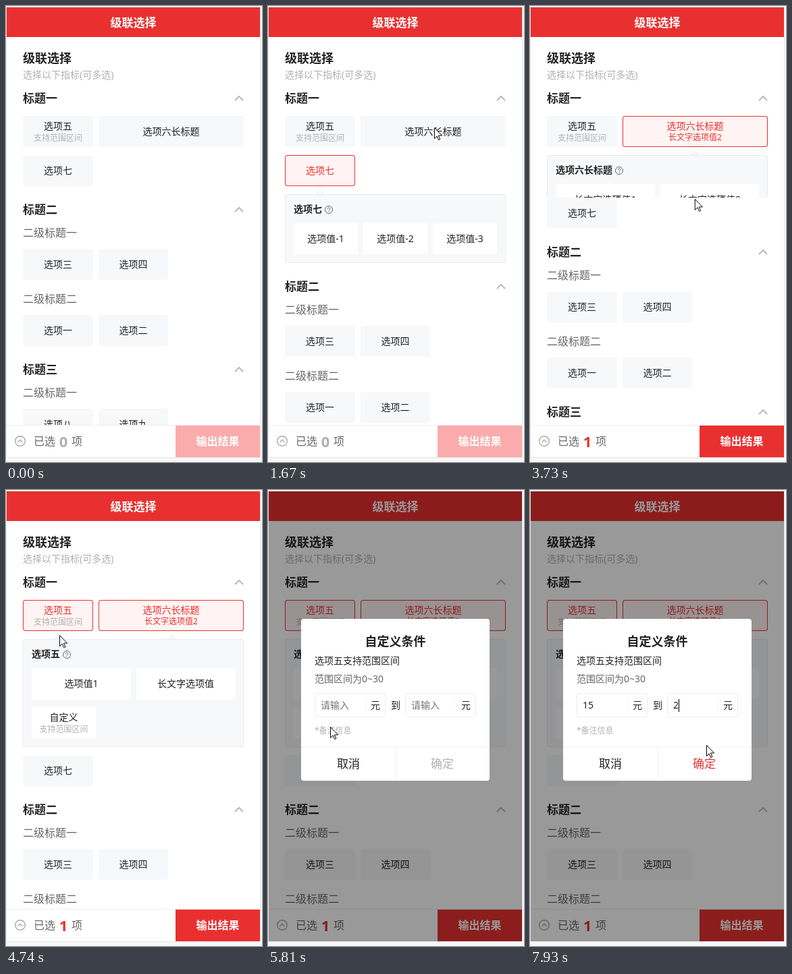
These frames come from a looping animation (379x676 px, 8000 ms). An HTML page:

```html
<!DOCTYPE html>
<html lang="zh-CN">
<head>
<meta charset="utf-8">
<title>级联选择</title>
<style>
@property --on { syntax: "<number>"; inherits: true; initial-value: 0; }
@property --pick { syntax: "<number>"; inherits: true; initial-value: 0; }
@property --f1 { syntax: "<number>"; inherits: true; initial-value: 0; }
@property --f2 { syntax: "<number>"; inherits: true; initial-value: 0; }
@property --a { syntax: "<number>"; inherits: true; initial-value: 0; }
@property --b { syntax: "<number>"; inherits: true; initial-value: 0; }

html, body { margin: 0; width: 100%; height: 100%; overflow: hidden; background: #f7f7f7; }
body { position: relative; color: #222; font: 14px/20px "Noto Sans", "Noto Sans CJK SC", "Noto Sans CJK", sans-serif; }
.phone { position: absolute; left: 1px; top: 2px; width: 375px; height: 667px; overflow: hidden; background: #fff; box-shadow: 0 0 2px rgba(0,0,0,.2); }
/* stage coordinates inside the phone */
.stage { position: absolute; left: -1px; top: -2px; width: 379px; height: 676px; animation: state 8s step-end infinite; }
.t, .card, .flow, .sec, .abs { position: absolute; white-space: nowrap; }
.sec { left: 0; }
.h { font-size: 17px; font-weight: 700; }
.s { font-size: 16px; color: #666; }
.b { font-weight: 700; }
.c { text-align: center; }
.note { font-size: 12px; color: #b0b0b0; }
svg { position: absolute; overflow: visible; fill: none; }
.chev { left: 339px; width: 12px; height: 7px; stroke: #bbb; stroke-width: 2; }

.header { left: 0; top: 0; width: 379px; height: 46px; background: #e93030; }
.flow { left: 0; top: 163px; width: 379px; }
.row { position: relative; height: 46px; margin-bottom: 12px; }
.card { height: 46px; border-radius: 4px; display: flex; flex-direction: column; align-items: center; justify-content: center; line-height: 18px;
  background: color-mix(in srgb, #fff4f3 calc(var(--on) * 100%), #f7f8fa);
  color: color-mix(in srgb, #e93030 calc(var(--on) * 100%), #222);
  box-shadow: inset 0 0 0 1px rgba(233,48,48,var(--on)); }
.card .note { line-height: 17px; }
.tip { left: calc(50% - 6px); top: 52px; width: 12px; height: 7px; opacity: var(--on); fill: #f7f8fa; stroke: #e6e8eb; }
.fold { position: relative; height: 0; overflow: hidden; }
.panel { position: absolute; left: 25px; top: 0; width: 327px; height: 102px; border-radius: 4px; background: #f7f8fa; box-shadow: inset 0 0 0 1px #e9ebee; }
.panel .t { left: 13px; top: 12px; }
.panel .card { top: 43px; background: #fff; border-radius: 2px; }
.help { position: relative; width: 12px; height: 12px; margin-left: 4px; vertical-align: -1.5px; stroke: #666; }

.o7 { animation: on7 8s infinite; }
.o6 { animation: on6 8s infinite; }
.o5 { animation: on5 8s infinite; }
.fold7 { animation: fold7 8s infinite; }
.fold6 { animation: fold6 8s infinite; }
.fold5 { animation: fold5 8s infinite; }
.o6 .lab { position: relative; top: calc(var(--pick) * -8px); }
.o6 .sub { position: absolute; top: 23px; font-size: 12px; opacity: var(--pick); }

.bar { left: 0; top: 621px; width: 379px; height: 54px; background: #fff; border-top: 1px solid #eee; }
.num { left: 75px; width: 20px; top: 13px; text-align: center; font-weight: 700; font-size: 22px; }
.go { left: 251px; top: 0; width: 125px; height: 47px; line-height: 47px; font-size: 16px; font-weight: 700; color: #fff; text-align: center;
  background: color-mix(in srgb, #e93030 calc(var(--pick) * 100%), #faacac); }

.mask { inset: 0; background: rgba(0,0,0,.4); opacity: 0; animation: mask 8s linear infinite; }
.modal { left: 49px; top: 191px; width: 279px; height: 240px; border-radius: 4px; background: #fff; }
.field { top: 110px; width: 105px; height: 36px; border-radius: 4px; box-shadow: inset 0 0 0 1px #ebedf0; }
.field .t { top: 8px; left: 9px; }
.field .unit { left: 83px; }
.field .line { left: 75px; top: 8px; width: 1px; height: 20px; background: #f4f5f6; }
.ph { color: #757575; }
.caret { top: 9px; width: 1px; height: 19px; background: #000; }
.btn { top: 190px; width: 140px; height: 50px; line-height: 50px; font-size: 17px; text-align: center; }
.ok { color: color-mix(in srgb, #e93030 calc(var(--b) * 100%), #b0b0b0); }
.pointer { left: 0; top: 0; width: 12px; height: 19px; fill: #fff; stroke: #000; animation: move 8s linear infinite; }

@keyframes state {
  45% { --pick: 1; }
  85.125% { --f1: 1; }
  86.5% { --a: 1; }
  88.75% { --a: 2; }
  95.5% { --f1: 0; --f2: 1; }
  97.5% { --b: 1; }
  100% { --pick: 1; --f1: 0; --f2: 1; --a: 2; --b: 1; }
}
@keyframes on7 { 0%, 17.6% { --on: 0; } 21.2%, 32.4% { --on: 1; } 35.5%, 100% { --on: 0; } }
@keyframes on6 { 0%, 28.5% { --on: 0; } 32%, 100% { --on: 1; } }
@keyframes on5 { 0%, 55.4% { --on: 0; } 58.7%, 100% { --on: 1; } }
@keyframes fold7 {
  0%, 17.5% { height: 0; animation-timing-function: ease-in-out; }
  20.8% { height: 114px; }
  28.7% { height: 114px; animation-timing-function: ease-in-out; }
  32.2%, 100% { height: 0; }
}
@keyframes fold6 {
  0%, 28.7% { height: 0; animation-timing-function: ease-in-out; }
  32.2% { height: 114px; }
  44.9% { height: 114px; animation-timing-function: ease-in-out; }
  48.6%, 100% { height: 0; }
}
@keyframes fold5 {
  0%, 55.6% { height: 0; animation-timing-function: ease-in-out; }
  59%, 100% { height: 172px; }
}
@keyframes mask { 0%, 70.8% { opacity: 0; } 72.5%, 100% { opacity: 1; } }
@keyframes move {
  0%, 3.37% { opacity: 0; transform: translate(240px,494px); }
  3.375%, 4.24% { opacity: 1; transform: translate(240px,494px); }
  4.25%, 6.75% { transform: translate(119px,316px); }
  10.875%, 13.375% { transform: translate(60px,182px); }
  15.875%, 17.625% { transform: translate(80px,243px); }
  20.875% { transform: translate(246px,180px); }
  22.25% { transform: translate(232px,174px); }
  25.125%, 27.625% { transform: translate(222px,185px); }
  32.625% { transform: translate(223px,186px); }
  37.5% { transform: translate(264px,287px); }
  38.375%, 45% { transform: translate(265px,287px); }
  46.625% { transform: translate(244px,286px); }
  54.125% { transform: translate(80px,183px); }
  55%, 57.5% { transform: translate(77px,186px); }
  59.25% { transform: translate(79px,215px); }
  65.875% { transform: translate(97px,286px); }
  67.5%, 69.25% { transform: translate(102px,291px); }
  71% { transform: translate(90px,348px); }
  72.625% { transform: translate(92px,351px); }
  79.25%, 82.625% { transform: translate(117px,311px); }
  83.375%, 89.375% { transform: translate(119px,320px); }
  94.375%, 95.875% { transform: translate(236px,330px); }
  99.125%, 100% { opacity: 1; transform: translate(261px,378px); }
}
</style>
</head>
<body>
<svg width="0" height="0">
  <symbol id="q" viewBox="0 0 12 12"><circle cx="6" cy="6" r="5.5"/><path d="M4.2 4.8a1.8 1.7 0 1 1 2.7 1.4Q6 6.7 6 7.5M6 8.4v1"/></symbol>
</svg>
<div class="phone"><div class="stage">
  <div class="t" style="left:25px;top:67px;font-size:18px;font-weight:700">级联选择</div>
  <div class="t" style="left:25px;top:92px;color:#b0b0b0">选择以下指标(可多选)</div>
  <div class="t h" style="left:25px;top:127px">标题一</div>
  <svg class="chev" style="top:134px"><path d="M0 6 6 0l6 6"/></svg>

  <div class="flow">
    <div class="row">
      <div class="card o5" style="left:25px;width:104px"><span>选项五</span><span class="note">支持范围区间</span>
        <svg class="tip"><path d="M0 6.5 6 .5l6 6"/></svg></div>
      <div class="card o6" style="left:137px;width:215px"><span class="lab">选项六长标题</span><span class="sub">长文字选项值2</span>
        <svg class="tip"><path d="M0 6.5 6 .5l6 6"/></svg></div>
    </div>
    <div class="fold fold6"><div class="panel">
      <div class="t b">选项六长标题<svg class="help"><use href="#q"/></svg></div>
      <div class="card" style="left:13px;width:147px">长文字选项值1</div>
      <div class="card" style="left:168px;width:146px">长文字选项值2</div>
    </div></div>
    <div class="fold fold5"><div class="panel" style="height:160px">
      <div class="t b">选项五<svg class="help"><use href="#q"/></svg></div>
      <div class="card" style="left:13px;width:147px">选项值1</div>
      <div class="card" style="left:168px;width:146px">长文字选项值</div>
      <div class="card" style="left:13px;top:101px;width:95px"><span>自定义</span><span class="note">支持范围区间</span></div>
    </div></div>
    <div class="row">
      <div class="card o7" style="left:25px;width:104px">选项七<svg class="tip"><path d="M0 6.5 6 .5l6 6"/></svg></div>
    </div>
    <div class="fold fold7"><div class="panel">
      <div class="t b">选项七<svg class="help"><use href="#q"/></svg></div>
      <div class="card" style="left:13px;width:95px">选项值-1</div>
      <div class="card" style="left:116px;width:95px">选项值-2</div>
      <div class="card" style="left:219px;width:95px">选项值-3</div>
    </div></div>
    <div class="sec">
      <div class="t h" style="left:25px;top:13px">标题二</div>
      <svg class="chev" style="top:20px"><path d="M0 6 6 0l6 6"/></svg>
      <div class="t s" style="left:25px;top:47px">二级标题一</div>
      <div class="card" style="left:25px;top:81px;width:104px">选项三</div>
      <div class="card" style="left:137px;top:81px;width:103px">选项四</div>
      <div class="t s" style="left:25px;top:145px">二级标题二</div>
      <div class="card" style="left:25px;top:179px;width:104px">选项一</div>
      <div class="card" style="left:137px;top:179px;width:103px">选项二</div>
      <div class="t h" style="left:25px;top:250px">标题三</div>
      <svg class="chev" style="top:257px"><path d="M0 6 6 0l6 6"/></svg>
      <div class="t s" style="left:25px;top:284px">二级标题一</div>
      <div class="card" style="left:25px;top:318px;width:104px">选项八</div>
      <div class="card" style="left:137px;top:318px;width:103px">选项九</div>
    </div>
  </div>

  <div class="abs header"><div class="t h c" style="left:1px;width:375px;top:15px;color:#fff">级联选择</div></div>

  <div class="abs bar">
    <svg style="left:13px;top:15px;width:16px;height:16px;stroke:#aaa;stroke-width:1.4"><circle cx="8" cy="8" r="7.3"/><path d="M4.5 9.7 8 6.2l3.5 3.5"/></svg>
    <div class="t s" style="left:41px;top:13px">已选</div>
    <div class="t num" style="color:#b0b0b0;opacity:calc(1 - var(--pick))">0</div>
    <div class="t num" style="color:#e93030;opacity:var(--pick)">1</div>
    <div class="t s" style="left:97px;top:13px">项</div>
    <div class="abs go">输出结果</div>
  </div>

  <div class="abs mask"><div class="abs modal">
    <div class="t b c" style="left:0;width:279px;top:23px;font-size:18px">自定义条件</div>
    <div class="t" style="left:20px;top:52px">选项五支持范围区间</div>
    <div class="t" style="left:20px;top:79px;color:#666">范围区间为0~30</div>
    <div class="abs field" style="left:20px">
      <div class="t ph" style="opacity:calc(1 - var(--a))">请输入</div>
      <div class="t" style="opacity:var(--a)">1</div>
      <div class="t" style="left:17px;opacity:calc(var(--a) - 1)">5</div>
      <div class="abs caret" style="left:calc(9px + var(--a) * 8px);opacity:var(--f1)"></div>
      <div class="abs line"></div><div class="t unit">元</div>
    </div>
    <div class="t" style="left:133px;top:118px">到</div>
    <div class="abs field" style="left:154px">
      <div class="t ph" style="opacity:calc(1 - var(--b))">请输入</div>
      <div class="t" style="opacity:var(--b)">2</div>
      <div class="abs caret" style="left:calc(9px + var(--b) * 8px);opacity:var(--f2)"></div>
      <div class="abs line"></div><div class="t unit">元</div>
    </div>
    <div class="t note" style="left:20px;top:156px">*备注信息</div>
    <div class="abs" style="left:0;top:190px;width:279px;height:1px;background:#f0f1f3"></div>
    <div class="abs" style="left:140px;top:190px;width:1px;height:50px;background:#f0f1f3"></div>
    <div class="abs btn" style="left:0">取消</div>
    <div class="abs btn ok" style="left:139px">确定</div>
  </div></div>

  <svg class="pointer"><path d="M.5 .5v16l3.7-3.6 2.5 5.6 2.2-1-2.5-5.5h5.2z"/></svg>
</div></div>
</body>
</html>
```
